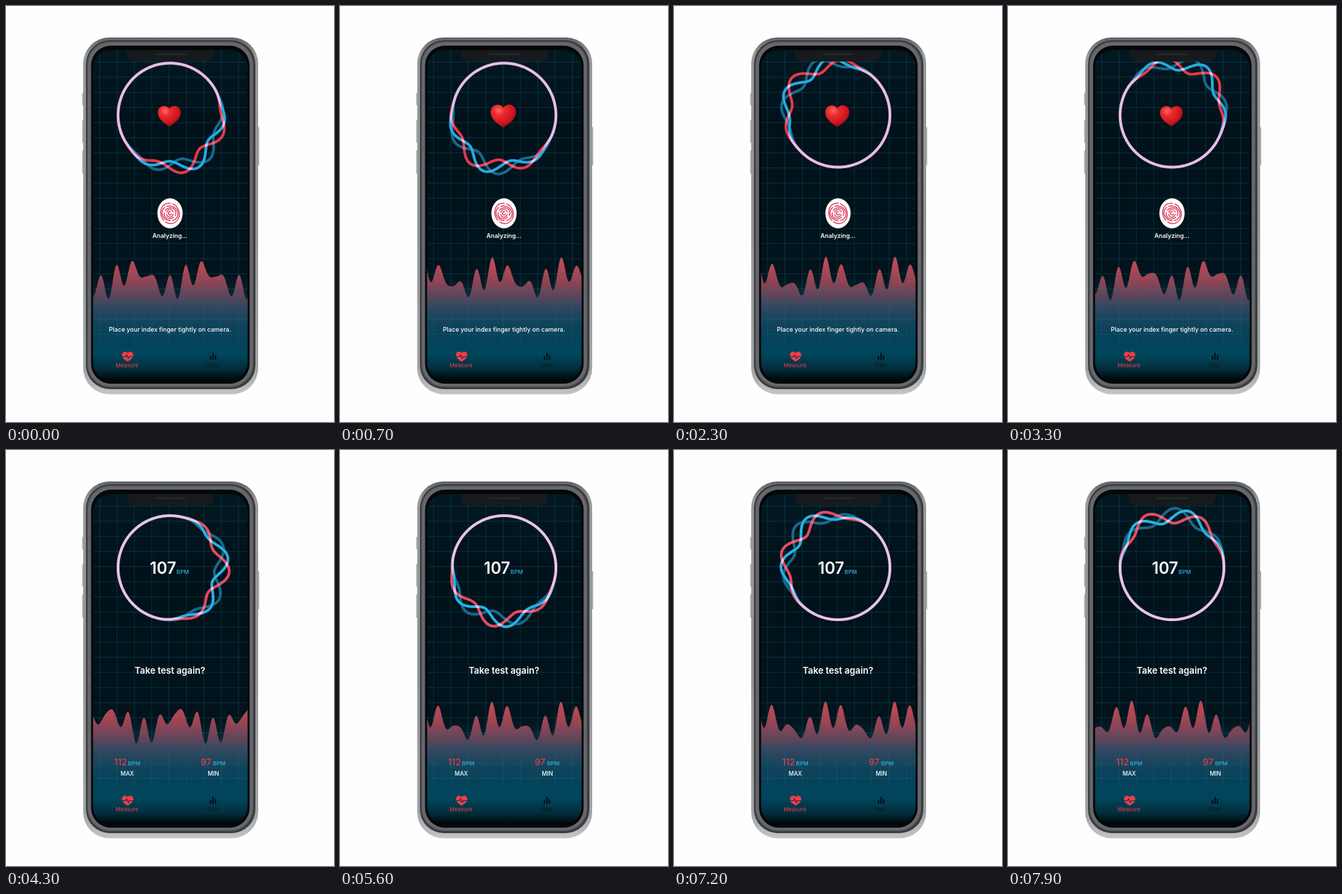
These frames come from a looping animation (480 px wide and 608 px high, 8 s). An HTML page:

```html
<!DOCTYPE html>
<html lang="en">
<head>
<meta charset="utf-8">
<title>Heart rate measurement</title>
<style>
  html, body { margin: 0; width: 100%; height: 100%; overflow: hidden; background: #fefefe; }
  svg { display: block; width: 100vw; height: 100vh; font-family: Inter, "Open Sans", sans-serif; }
  text { text-anchor: middle; }
  .left text { text-anchor: start; }
  .unit { font-size: 8.2px; font-weight: 500; fill: #2fb0e2; }
  .strand { fill: none; stroke-width: 4; stroke-linejoin: round; mix-blend-mode: screen; }
  .strand.dim { mix-blend-mode: lighten; }
</style>
</head>
<body>
<svg viewBox="0 0 480 608">
  <defs>
    <linearGradient id="metal" x2="0" y2="1">
      <stop offset="0" stop-color="#606265"/>
      <stop offset=".05" stop-color="#97999c"/>
      <stop offset=".5" stop-color="#929497"/>
      <stop offset=".93" stop-color="#a2a3a5"/>
      <stop offset="1" stop-color="#c4c5c6"/>
    </linearGradient>
    <linearGradient id="backdrop" gradientUnits="userSpaceOnUse" x1="0" y1="65" x2="0" y2="547">
      <stop offset="0" stop-color="#021822"/>
      <stop offset=".2" stop-color="#01121b"/>
      <stop offset=".68" stop-color="#01131c"/>
      <stop offset=".76" stop-color="#0a2a3a"/>
      <stop offset=".85" stop-color="#07415a"/>
      <stop offset=".92" stop-color="#00465c"/>
      <stop offset=".965" stop-color="#022e3d"/>
      <stop offset="1" stop-color="#00070a"/>
    </linearGradient>
    <linearGradient id="pulseFill" gradientUnits="userSpaceOnUse" x1="0" y1="358" x2="0" y2="492">
      <stop offset="0" stop-color="#d04c59"/>
      <stop offset=".25" stop-color="#a84653"/>
      <stop offset=".45" stop-color="#6c4458"/>
      <stop offset=".6" stop-color="#33485f"/>
      <stop offset=".78" stop-color="#15465e" stop-opacity=".85"/>
      <stop offset="1" stop-color="#07425a" stop-opacity="0"/>
    </linearGradient>
    <radialGradient id="heartFill" cx=".32" cy=".25" r=".8">
      <stop offset="0" stop-color="#ff6a60"/>
      <stop offset=".3" stop-color="#ea2a2c"/>
      <stop offset=".7" stop-color="#d31620"/>
      <stop offset="1" stop-color="#8f0a14"/>
    </radialGradient>
    <clipPath id="screenClip"><rect x="127.500" y="64.500" width="226" height="482" rx="25"/></clipPath>
    <clipPath id="ringClip"><rect x="128" y="81" width="225" height="240"/></clipPath>
    <path id="heart" d="M0 17C-7 12-18 5-18-6C-18-13-13-17-8.500-17C-4-17-1.500-15 0-12C1.500-15 4-17 8.500-17C13-17 18-13 18-6C18 5 7 12 0 17Z"/>
  </defs>

  <g fill="#a9abad">
    <rect x="111.500" y="127" width="4" height="18" rx="1"/>
    <rect x="111.500" y="167" width="4" height="33" rx="1"/>
    <rect x="111.500" y="211" width="4" height="34" rx="1"/>
    <rect x="367" y="177" width="3.500" height="56" rx="1"/>
  </g>
  <rect x="113" y="46" width="256" height="521.500" rx="38" fill="url(#metal)"/>
  <rect x="117" y="50" width="248" height="510" rx="35" fill="#3b3d40"/>
  <rect x="119.500" y="52.500" width="242" height="504" rx="33" fill="#66686b" stroke="#515356"/>
  <rect x="124.500" y="58" width="232" height="494" rx="29" fill="#050709"/>

  <g clip-path="url(#screenClip)">
    <rect x="127" y="64" width="227" height="483" fill="url(#backdrop)"/>
    <path id="wave" fill="url(#pulseFill)"/>
    <path id="grid" fill="none" stroke="#1d7480" stroke-opacity=".32"/>
    <rect x="177" y="50" width="127" height="31" rx="11" fill="#171a1d"/>
    <rect x="217" y="69" width="47" height="3" rx="1.500" fill="#212528"/>
  </g>

  <g id="ring">
    <path class="strand" stroke="#e6394c"/>
    <path class="strand" stroke="#29a9dc"/>
    <path class="strand dim" stroke="#17698a"/>
  </g>

  <g id="analyzing" fill="#fff">
    <use id="beat" href="#heart" fill="url(#heartFill)"/>
    <ellipse cx="240" cy="303" rx="18.500" ry="22"/>
    <g id="print" fill="none" stroke="#dc3a56" stroke-width="1.400" stroke-linecap="round"/>
    <text x="240" y="339" font-size="8.900" font-weight="600">Analyzing...</text>
    <text x="240" y="475.500" font-size="9" font-weight="500">Place your index finger tightly on camera.</text>
  </g>

  <g id="result" fill="#fff">
    <g class="left">
      <text x="210.500" y="181" font-size="23.600" font-weight="600">107</text>
      <text x="249.500" y="181" class="unit">BPM</text>
      <text x="158" y="461" font-size="13.200" font-weight="500" fill="#e23b49">112</text>
      <text x="178.500" y="461" class="unit">BPM</text>
      <text x="285" y="461" font-size="13.200" font-weight="500" fill="#e23b49">97</text>
      <text x="303" y="461" class="unit">BPM</text>
    </g>
    <text x="240" y="326.500" font-size="13.200" font-weight="600">Take test again?</text>
    <text x="177.500" y="476" font-size="8.300" font-weight="500">MAX</text>
    <text x="303.500" y="476" font-size="8.600" font-weight="500">MIN</text>
  </g>

  <use href="#heart" transform="translate(178 512.500) scale(.46 .43)" fill="#f23c48"/>
  <path d="M170 512.500H175L176.500 510L179 515L180.500 512.500H186" fill="none" stroke="#063a4b" stroke-width="1.200"/>
  <text x="177" y="528" font-size="8.100" fill="#f23c48">Measure</text>
  <path d="M299.200 517V511.500M302.900 517V507M306.600 517V510" stroke="#020d13" stroke-width="2"/>
  <text x="302.500" y="528" font-size="7.500" fill="#021a24">Stats</text>
</svg>

<script>
const LOOP = 8000, STEP = 100, RESULT_AT = 3800;
const TAU = Math.PI * 2, RAD = Math.PI / 180;
const byId = id => document.getElementById(id);
const strands = document.querySelectorAll('.strand');
const strandShift = [0, -15, -29];

const toPath = points => 'M' + points.map(p => p.map(v => v.toFixed(2)).join(' ')).join('L');

// Wavelength, speed in px per second, crest at zero, height
const crests = [[101, 62.3, 187, 13], [25.3, 15.2, 238.2, 13.5], [20.2, 0, 241.8, 7.5]];

function wavePath(s) {
  const points = [];
  for (let x = 127; x <= 354; x++) {
    let y = 399;
    for (const [length, speed, start, height] of crests)
      y -= height * Math.cos(TAU * (x - start - speed * s) / length);
    points.push([x, y]);
  }
  return toPath(points) + 'V492H127Z';
}

function strandPath(s, cy, crest) {
  const center = 60 + 72 * s, points = [];
  for (let d = -180; d < 180; d += 2) {
    const envelope = Math.max(0, Math.cos(d * RAD)) ** 1.6;
    const r = 76 + 11 * envelope * Math.cos(6 * (d - crest) * RAD);
    const a = (center + d) * RAD;
    points.push([240 + r * Math.cos(a), cy + r * Math.sin(a)]);
  }
  return toPath(points) + 'Z';
}

function drawGrid() {
  let d = '';
  for (let x = 137; x < 353; x += 25.4) d += `M${x} 65V490`;
  for (let y = 82; y < 490; y += 22.1) d += `M128 ${y}H353`;
  byId('grid').setAttribute('d', d);
}

function drawPrint() {
  let ridges = '';
  for (let i = 0; i < 5; i++) {
    const r = 2.2 + i * 2.8;
    ridges += `<ellipse cx="240" cy="303" rx="${r}" ry="${r * 1.13}"
      stroke-dasharray="${r * 2.6} 3.4" transform="rotate(${150 + i * 47} 240 303)"/>`;
  }
  byId('print').innerHTML = ridges;
}

function render(ms) {
  const s = ms / 1000, done = ms >= RESULT_AT;
  const cy = done ? 172 : 159.5;
  const crest = 17 - 89 * s;
  byId('wave').setAttribute('d', wavePath(s));
  strands.forEach((el, i) => el.setAttribute('d', strandPath(s, cy, crest + strandShift[i])));
  byId('ring').setAttribute('clip-path', done ? 'none' : 'url(#ringClip)');
  byId('analyzing').style.display = done ? 'none' : '';
  byId('result').style.display = done ? '' : 'none';
  const scale = 1.06 + .14 * Math.cos(TAU * (s - 1.4) / .545);
  byId('beat').setAttribute('transform', `translate(239 161) scale(${scale} ${scale * .95})`);
}

drawGrid();
drawPrint();
const begin = performance.now();
(function frame() {
  const ms = (performance.now() - begin) % LOOP;
  render(Math.floor(ms / STEP) * STEP);
  requestAnimationFrame(frame);
})();
</script>
</body>
</html>
```
